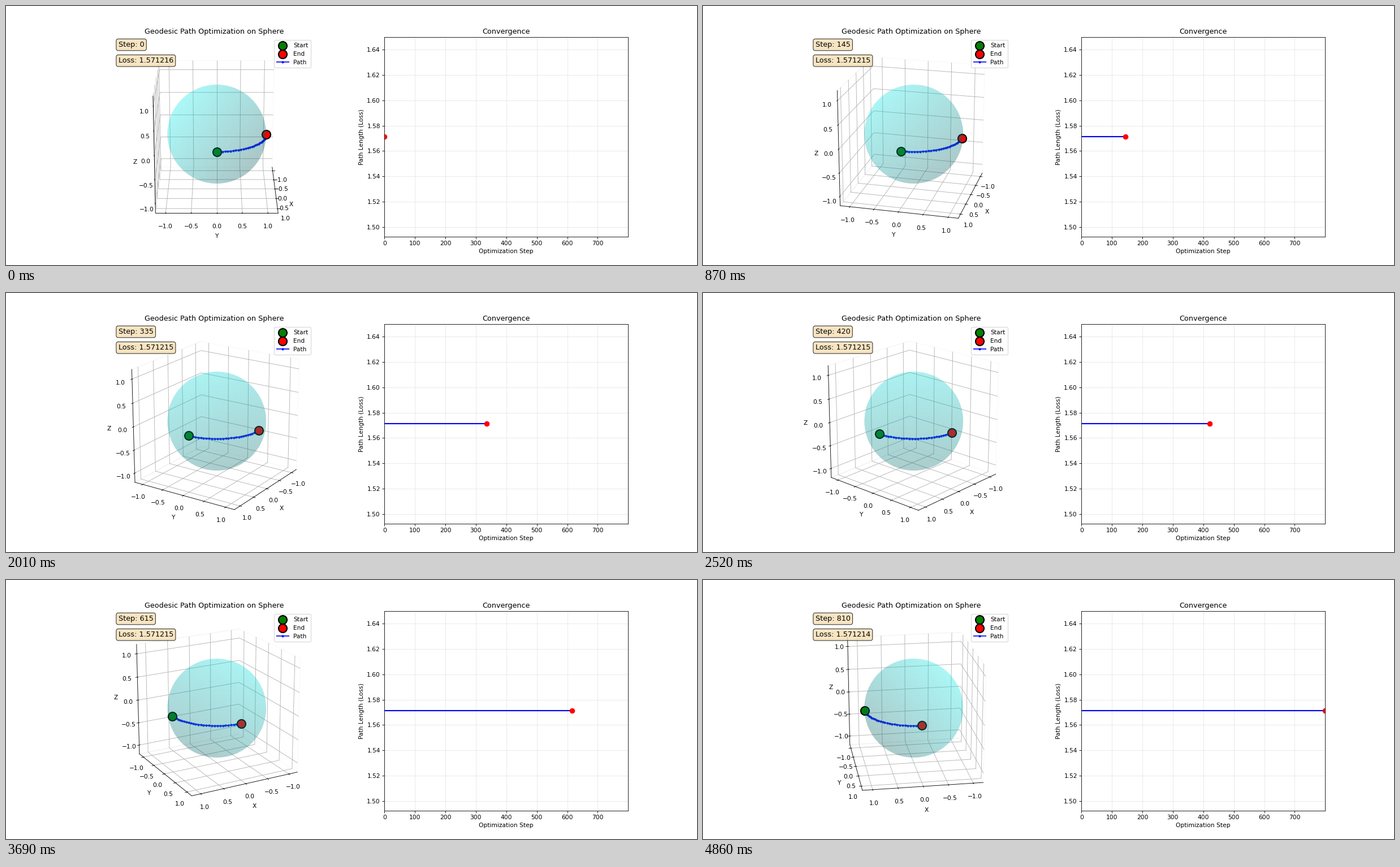
Animation of 1222x458 px, one loop 4.89 s. Source, as a matplotlib script:

```python
import numpy as np
import matplotlib.pyplot as plt
from matplotlib.animation import FuncAnimation

WIDTH, HEIGHT, DPI = 1222, 458, 76.375
FRAMES, INTERVAL = 163, 30
STEP_SIZE, LAST_STEP = 5, 799
LOSS = 1.571215

# the small offset keeps the pixel size from rounding down
fig = plt.figure(figsize=((WIDTH + 1e-6) / DPI, (HEIGHT + 1e-6) / DPI), dpi=DPI)


def loss_at(step):
    return 1.5712156 - 1.4e-9 * step


def make_sphere(n_lon=50, n_lat=34):
    lon = np.linspace(0, 2 * np.pi, n_lon)
    lat = np.linspace(0, np.pi, n_lat)
    x = np.outer(np.cos(lon), np.sin(lat))
    y = np.outer(np.sin(lon), np.sin(lat))
    z = np.outer(np.ones(n_lon), np.cos(lat))
    return x, y, z


def add_point(ax, pos, color, label):
    ax.scatter(*pos, s=200, c=color, edgecolors="black", linewidths=2,
               depthshade=False, label=label)


def add_note(ax, y):
    return ax.text2D(0.02, y, "", transform=ax.transAxes, fontsize=12, va="top",
                     bbox=dict(boxstyle="round", facecolor="wheat", alpha=0.8))


# Sphere view
ax3d = fig.add_subplot(121, projection="3d")
ax3d.plot_surface(*make_sphere(), color="cyan", alpha=0.18, linewidth=0)
add_point(ax3d, ([1], [0], [0]), "green", "Start")
add_point(ax3d, ([0], [1], [0]), "red", "End")
angle = np.linspace(0, np.pi / 2, 30)
ax3d.plot(np.cos(angle), np.sin(angle), np.zeros_like(angle), "bo-",
          linewidth=2, markersize=3, alpha=0.8, label="Path")

ax3d.set(xlim=(-1.2, 1.2), ylim=(-1.2, 1.2), zlim=(-1.2, 1.2),
         xlabel="X", ylabel="Y", zlabel="Z")
for axis in (ax3d.xaxis, ax3d.yaxis, ax3d.zaxis):
    axis.set_ticks([-1, -0.5, 0, 0.5, 1])
    axis.pane.fill = False
ax3d.set_box_aspect([1, 1, 1])
ax3d.set_title("Geodesic Path Optimization on Sphere")
ax3d.legend(loc="upper right")
step_note = add_note(ax3d, 0.98)
loss_note = add_note(ax3d, 0.90)

# Convergence chart
ax = fig.add_subplot(122)
ax.set(xlim=(0, LAST_STEP), ylim=(0.95 * LOSS, 1.05 * LOSS),
       xlabel="Optimization Step", ylabel="Path Length (Loss)",
       title="Convergence")
ax.grid(True, alpha=0.3)
curve, = ax.plot([], [], "b-", linewidth=2)
dot, = ax.plot([], [], "ro", markersize=8)


def update(frame):
    step = frame * STEP_SIZE
    ax3d.view_init(elev=20, azim=0.5 * frame)
    step_note.set_text(f"Step: {step}")
    loss_note.set_text(f"Loss: {loss_at(step):.6f}")

    steps = np.arange(min(step, LAST_STEP) + 1)
    curve.set_data(steps, loss_at(steps))
    dot.set_data(steps[-1:], loss_at(steps[-1:]))
    return curve, dot, step_note, loss_note


anim = FuncAnimation(fig, update, frames=FRAMES, interval=INTERVAL,
                     repeat=True, repeat_delay=0, blit=False)
plt.show()
```
